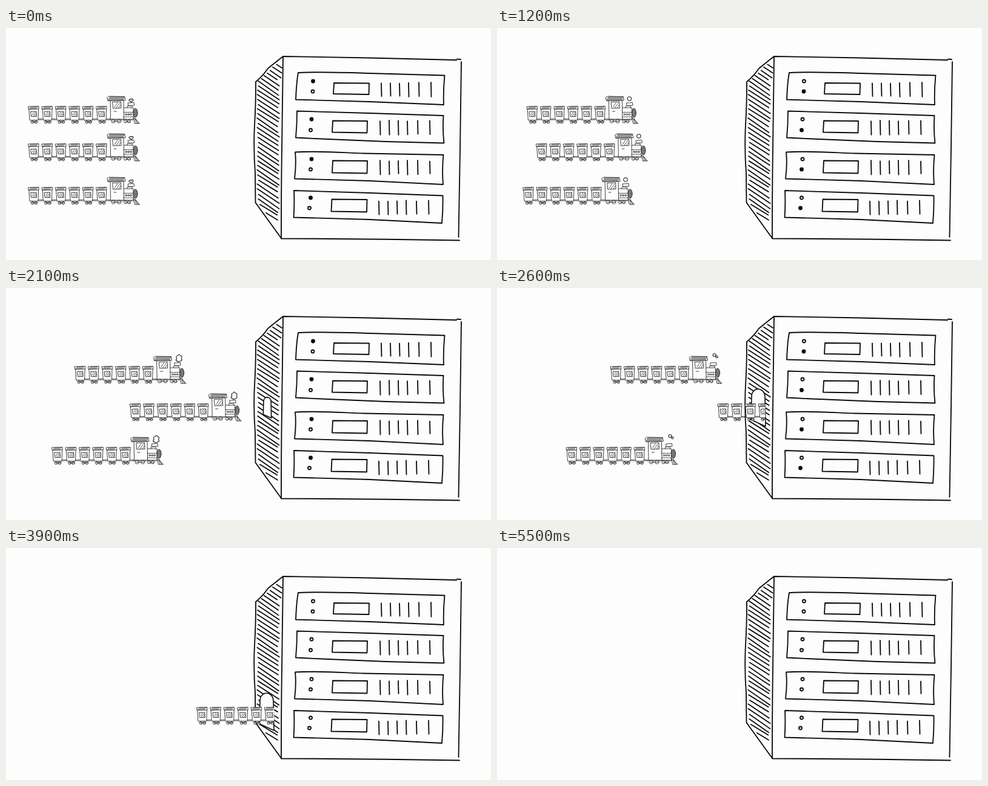
Recreate the animation shown at these times as an HTML page. Size 800x384 px, loop 5700 ms.

```html
<!DOCTYPE html>
<html lang="en">
<head>
<meta charset="utf-8">
<title>Trains entering a server</title>
<style>
  html, body { margin: 0; width: 100%; height: 100%; overflow: hidden; background: #fdfdfd; }
  svg { display: block; width: 100vw; height: 100vh; }
  path, circle, ellipse { fill: none; stroke-linecap: round; stroke-linejoin: round; }
  #server { stroke: #0b0b0b; stroke-width: 1.85; }
  #hatch { stroke-width: 1.8; }
  .door { fill: #fdfdfd; stroke: #0b0b0b; stroke-width: 1.6; vector-effect: non-scaling-stroke; }
  .train { stroke: #1f1f1f; stroke-width: .85; }
  .train .body { fill: #fdfdfd; }
  .train .fine { stroke-width: .75; }
  .train .dark { fill: #777; }
  .train .smoke { stroke-width: 1.1; }
</style>
</head>
<body>
<svg viewBox="0 0 800 384">
  <defs><clipPath id="outside"><path d="M0 0H442.5V384H0Z"/></clipPath></defs>
  <g id="server"></g>
  <g id="doors"></g>
  <g id="trains" clip-path="url(#outside)"></g>
</svg>
<script>
const LOOP = 5700, STEP = 100, PULSE = 1650;
const $ = id => document.getElementById(id);

function add(parent, tag, attrs) {
  const node = document.createElementNS('http://www.w3.org/2000/svg', tag);
  for (const key in attrs) node.setAttribute(key, attrs[key]);
  return parent.appendChild(node);
}
const draw = (parent, d, cls = '') => add(parent, 'path', { d, class: cls });
const ring = (parent, cx, cy, r, cls = '') => add(parent, 'circle', { cx, cy, r, class: cls });

let seed = 7;
const jitter = size => {
  seed = (seed * 16807) % 2147483647;
  return (seed / 2147483647 - .5) * 2 * size;
};

// Server cabinet
const server = $('server');
draw(server, 'M457 47L600 49.5L743 53M744 51.5L750 52M751 56Q750 140 749 200T746.5 346M748 351.5Q600 349 454 348.5M457 47Q456 140 455 200T454 348');
draw(server, 'M457 47Q443 58 432 67Q423 80 412 89Q412 130 410 160Q408 200 411 240L411.5 289L454 348');

const hatch = add(server, 'g', { id: 'hatch' });
for (let y = 24; y < 300; y += 7.8) {
  const slope = .66 + jitter(.05);
  let x1 = 415.5 + jitter(1.5);
  const x2 = 449 + jitter(2) + (y < 60 ? 5 : 0);
  const at = x => y + (x - 414) * slope;
  const edge = x => at(x) < 89 ? 459 - (at(x) - 47) * 1.07
    : at(x) > 287 ? 415 + (at(x) - 287) * .72 : 413;
  while (x1 < x2 && x1 < edge(x1)) x1++;
  if (x2 - x1 > 4) draw(hatch, `M${x1} ${at(x1)}L${x2} ${at(x2)}`);
}

// Outline, display corner and size, first tick and its top, upper and lower lamp
const units = [
  { box: 'M482 74C520 72 570 74 600 75L723.5 78.5Q721 105 722 127L600 122L478 118.5Q479 90 482 74Z', screen: [540, 91, 59, 18], tick: [619, 91], lamps: [506.5, 88, 506, 105] },
  { box: 'M480 137.5L600 141L721.5 145Q720 170 722.5 190.5Q600 188 478 181.5Q480 160 480 137.5Z', screen: [538, 153.5, 58, 19], tick: [617, 154], lamps: [504, 151, 502.5, 169] },
  { box: 'M477 205.5C510 203 550 206 590 207.5L721.5 210Q719 235 721 259L600 253L476 249.5Q479 225 477 205.5Z', screen: [538, 219.5, 58, 20], tick: [617, 220], lamps: [504, 217, 502.5, 234] },
  { box: 'M475 269L600 273L720.5 277.5Q721 300 719 323L600 317L474.5 313.5Q476 290 475 269Z', screen: [536.5, 283.5, 59, 20], tick: [615, 286], lamps: [502.5, 281, 500.5, 298] }
];
const upper = [], lower = [];
for (const { box, screen: [x, y, w, h], tick: [tx, ty], lamps: [ux, uy, lx, ly] } of units) {
  draw(server, box);
  draw(server, `M${x + 1} ${y}L${x + w} ${y + .5}L${x + w - .5} ${y + h + 1}L${x} ${y + h}Z`);
  for (const dx of [0, 15, 30, 45, 62, 82])
    draw(server, `M${tx + dx} ${ty + jitter(1)}L${tx + dx + .5} ${ty + 22 + jitter(1)}`);
  upper.push(ring(server, ux, uy, 2.5));
  lower.push(ring(server, lx, ly, 2.5));
}

// Diagonal strokes inside a small rectangle
function shade(parent, x, y, w, h, gap, lean) {
  let d = '';
  for (let i = gap / 2; i < w - lean; i += gap) d += `M${x + i} ${y + h}L${x + i + lean} ${y}`;
  draw(parent, d, 'fine');
}

function drawCar(train, x) {
  const car = add(train, 'g', { transform: `translate(${x} 0)` });
  draw(car, 'M16.5 38.5H24M16.5 40H23', 'fine');
  draw(car, 'M.8 22L2 40.5H16L16.6 22Z', 'body');
  draw(car, 'M0 18L17 17.5L17 22L.5 22.5Z', 'body');
  shade(car, .5, 18, 16.5, 4, 1.8, 3);
  draw(car, 'M4 26.5L13 26L13.5 34.5H5Z');
  draw(car, 'M6 32L9 27.5M8 33.5L12 27.5M11 33.5L13 30', 'fine');
  ring(car, 6.5, 43.8, 2.2, 'body');
  ring(car, 12.5, 43.8, 2.2, 'body');
  draw(car, 'M4 42.5H15M6.500 44H13', 'fine');
}

function drawEngine(train) {
  draw(train, 'M157 20H173V39H157Z', 'body');
  draw(train, 'M135 8L135.5 39H157.5L157 8Z', 'body');
  draw(train, 'M130 3L133 1L158.5 1.5L160 7.5L131.5 8.5Z', 'body');
  shade(train, 130.5, 1.5, 29, 6.5, 1.6, 3.5);
  draw(train, 'M139 10.5L152.5 10L153 20.5L140 21Z');
  draw(train, 'M142 19L147 11.5M145 20L151 12M149 20L152 15.5', 'fine');
  draw(train, 'M141 26H145', 'dark');
  draw(train, 'M157 27.5H173M157 35H173M163 20V17H171V20', 'fine');
  draw(train, 'M164.500 12L174 11.5L174.500 16L165 16.5Z', 'body');
  for (const x of [161, 165, 169]) ring(train, x, 31, 1.3);
  add(train, 'ellipse', { cx: 176.5, cy: 28.5, rx: 3.5, ry: 7.5, class: 'dark' });
  draw(train, 'M174 36.5L183.5 46H175.5ZM176 38L178 46M177 38L181 46');
  for (const x of [140, 149.5]) ring(train, x, 42, 3.1, 'body');
  for (const x of [160, 166]) ring(train, x, 42.5, 2.5, 'body');
  draw(train, 'M134 40H174M139 42.5H151M160 43H168', 'fine');
}

// Puff shapes and the phase at which each one begins
const puffs = [
  [1560, 'M169.5 10.5Q164 7.500 167 6Q169 5 169.5 6.5Q171 4.5 172.5 6Q174 8 169.5 10.5Z'],
  [320, 'M169 9Q165 8 168 5Q166 0 170 0Q172 -4 174 0Q178 1 175.5 4Q178 8 174 9Q171 11 169 9Z'],
  [700, 'M168.5 -1A2.5 2.3 0 1 0 173.5 -1A2.5 2.3 0 1 0 168.5 -1M173.3 2A1.7 1.7 0 1 0 176.7 2A1.7 1.7 0 1 0 173.3 2'],
  [1150, 'M165.7 5A3.3 3.3 0 1 0 172.3 5A3.3 3.3 0 1 0 165.7 5']
];
const puffAt = phase =>
  phase < 320 || phase >= 1560 ? puffs[0][1] : puffs.slice(1).filter(p => p[0] <= phase).pop()[1];

// Trains speed up with the cube of time; doors open ahead and shut behind them
const trains = [
  { y: 112, rate: .2145, delay: 1.2, door: [430, 131], opens: 2620, shuts: 3570 },
  { y: 174, rate: .2757, delay: 1, door: [431, 198], opens: 2000, shuts: 2750 },
  { y: 246, rate: .174, delay: 1.5, door: [430, 271], opens: 3250, shuts: 4400 }
];
for (const train of trains) {
  train.gate = draw($('doors'), 'M-12 20L-11 -18C-11 -35 10 -35 11 -18L12 31Z', 'door');
  train.node = add($('trains'), 'g', { class: 'train' });
  for (let i = 0; i < 6; i++) drawCar(train.node, i * 22.4);
  drawEngine(train.node);
  train.smoke = draw(train.node, '', 'smoke');
}

const clamp = v => Math.max(0, Math.min(1, v));
const easeOut = v => 1 - (1 - v) ** 2;

function render(time) {
  const phase = time % PULSE;
  const paint = (lamps, on) => lamps.forEach(lamp => lamp.style.fill = on ? '#0b0b0b' : 'none');
  paint(upper, phase < 550);
  paint(lower, phase >= 940 && phase < 1390);

  for (const train of trains) {
    const x = 37 + (train.rate * Math.max(0, time / 100 - train.delay)) ** 3;
    train.node.setAttribute('transform', `translate(${x} ${train.y})`);
    train.node.style.display = x > 445 ? 'none' : '';
    train.smoke.setAttribute('d', puffAt(phase));

    const open = easeOut(clamp((time - train.opens) / 300)) * (1 - clamp((time - train.shuts) / 300) ** 2);
    train.gate.style.display = open > .01 ? '' : 'none';
    train.gate.setAttribute('transform', `translate(${train.door}) scale(${open})`);
  }
}

const start = performance.now();
function tick() {
  const time = (performance.now() - start) % LOOP;
  render(Math.floor(time / STEP) * STEP);
  requestAnimationFrame(tick);
}
tick();
</script>
</body>
</html>
```
